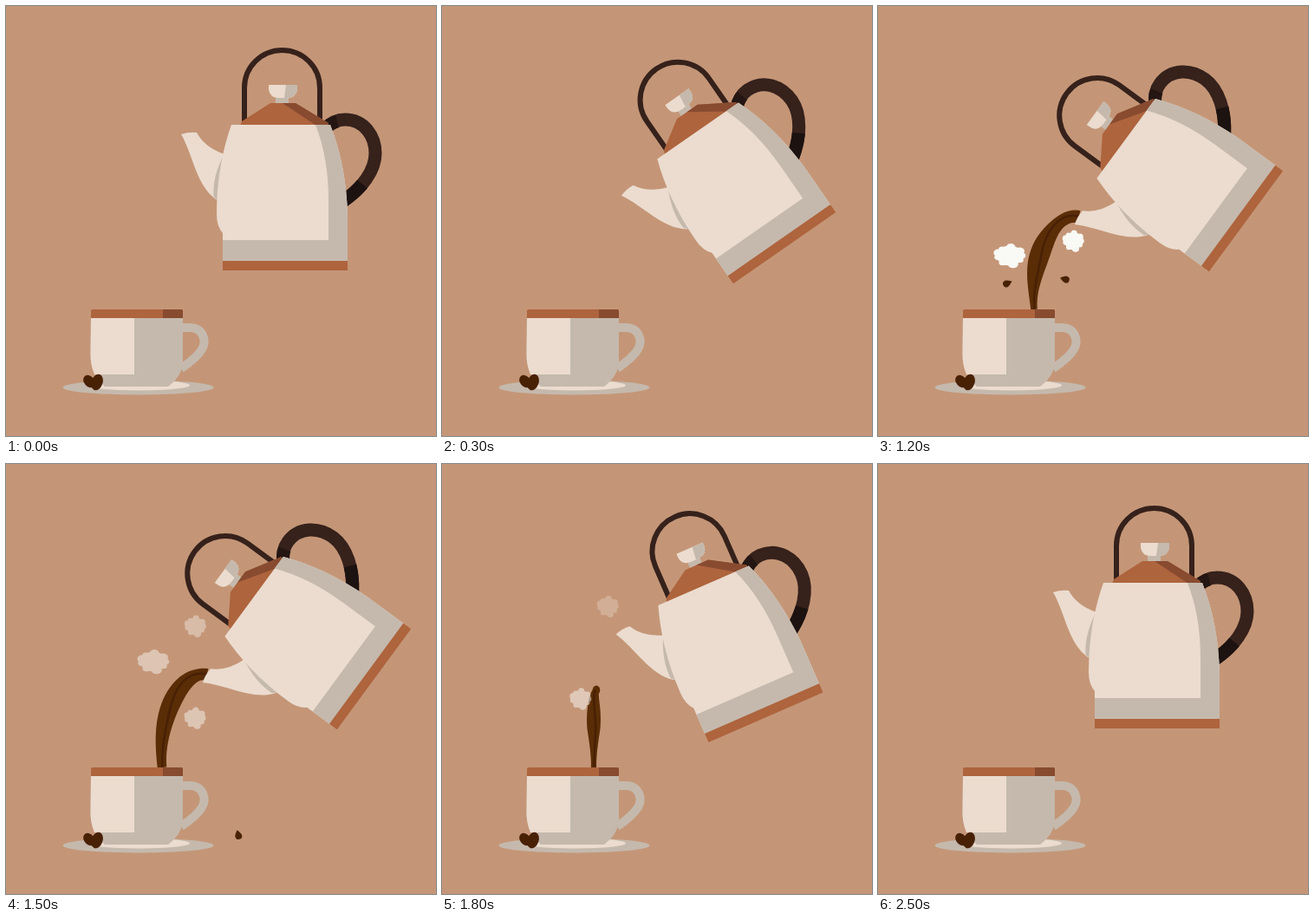
Write an HTML page with a canvas that moves like this. It is 496x496 px and loops after 2.6 s.

```html
<!DOCTYPE html>
<html lang="en">
<head>
<meta charset="utf-8">
<title>Pouring coffee</title>
<style>
  html, body { margin: 0; width: 100%; height: 100%; overflow: hidden; background: #c49677; }
  canvas { display: block; }
</style>
</head>
<body>
<canvas id="stage" width="496" height="496"></canvas>
<script>
const ctx = document.getElementById('stage').getContext('2d');
const LOOP = 2600, STEP = 100;
const CREAM = '#ebdccf', GREY = '#c5b9ad', RUST = '#ae643d', DARK_RUST = '#884b30';
const IRON = '#36211b', BLACK = '#1c1210', COFFEE = '#5a2d07', BEAN = '#482105';
const PIVOT = [317.2, 175.4], TILT = 53.7 * Math.PI / 180;

const clamp = v => Math.max(0, Math.min(1, v));
const mix = (a, b, p) => a + (b - a) * p;
const smooth = v => { v = clamp(v); return v * v * (3 - 2 * v); };

function fill(d, color) {
  ctx.fillStyle = color;
  ctx.fill(new Path2D(d));
}
function stroke(d, color, width) {
  ctx.strokeStyle = color;
  ctx.lineWidth = width;
  ctx.stroke(new Path2D(d));
}
function ellipse(x, y, rx, ry, color, turn = 0) {
  ctx.fillStyle = color;
  ctx.beginPath();
  ctx.ellipse(x, y, rx, ry, turn, 0, 7);
  ctx.fill();
}

function kettle(angle) {
  ctx.save();
  ctx.translate(...PIVOT);
  ctx.rotate(-angle);
  ctx.translate(-PIVOT[0], -PIVOT[1]);
  // handles
  stroke('M275 136V94.5A43.5 43.5 0 0 1 362 94.5V136', IRON, 6);
  stroke('M368 142Q378 131 391 131C413 131 426 150 426 170C426 190 410 211 389 225', IRON, 15);
  stroke('M368 142Q374 135 382 133', '#241612', 15);
  stroke('M411 205.4Q402 216 389 225', BLACK, 15);
  // knob and lid
  fill('M311 104H326V113H311Z', GREY);
  fill('M303 91H336V96Q335 106 324 106H315Q304 106 303 96Z', CREAM);
  fill('M323 91H336V96Q335 106 324 106H321Z', GREY);
  fill('M305 112H334L372 135V138H270L272 133Z', RUST);
  fill('M319 112H334L372 135V138H358Z', DARK_RUST);
  // spout
  fill('M202 148Q211 145 220 146Q229 163 252 171L246 223H242C219 206 216 172 202 148Z', CREAM);
  fill('M252 170Q238 196 239.5 220L246 226Z', GREY);
  // body
  fill('M260 137H374C387 170 393 205 394 240V295H250V262Q243 254 243 240C243 200 250 165 260 137Z', CREAM);
  fill('M357 137H374C387 170 393 205 394 240V295H250V270H372V225C372 190 367 163 357 137Z', GREY);
  fill('M250 294H394V305H250Z', RUST);
  ctx.restore();
}

function cup() {
  ellipse(152.5, 440, 87, 8.5, GREY);
  ellipse(153, 437.5, 59, 6, CREAM);
  stroke('M202 371H212C227 371 232 386 226 396Q220 406 202 418', GREY, 10);
  fill('M98 359H204V413Q202 428 187 439H114Q97 424 97.5 400Z', GREY);
  fill('M98 359H148V425H102Q97 413 97.5 400Z', CREAM);
  fill('M100 350H202Q204 350 204 352V360H98V352Q98 350 100 350Z', RUST);
  fill('M181 350H202Q204 350 204 352V360H181Z', DARK_RUST);
  ellipse(96, 433, 6, 8, BEAN, -0.7);
  ellipse(105, 434, 6.5, 9.5, BEAN, 0.35);
}

// Stream of coffee along a cubic curve, cut to the part between tail and head
function stream(t) {
  const head = clamp((t - 540) / 440);
  const tail = Math.pow(clamp((t - 1600) / 400), 1.32);
  if (head <= 0 || tail >= 1) return;
  const fall = clamp((t - 1600) / 200);
  const bezier = (u, a, b, c, d) => {
    const v = 1 - u;
    return v * v * v * a + 3 * v * v * u * b + 3 * v * u * u * c + u * u * u * d;
  };
  const center = u => [
    mix(bezier(u, 232, 203, 174, 180), 175 + 3 * Math.exp(-20 * (u - tail)), fall),
    bezier(u, 243, 237, 290, 350)
  ];
  const half = u => {
    const swell = 5.5 * Math.sin(Math.PI * u ** 1.3) ** 2 + .8 * Math.sin(9 * u - t / 110) * clamp(5 * u);
    return (7 - 2.5 * u + swell * head * head) * mix(1, Math.min(.8, .4 + 1.2 * (u - tail)), fall);
  };
  const side = (u, k) => {
    const [x, y] = center(u), [x2, y2] = center(u + .01);
    const len = Math.hypot(x2 - x, y2 - y), w = half(u) * k;
    return [x - (y2 - y) / len * w, y + (x2 - x) / len * w];
  };
  const N = 30, edge = [], line = [];
  for (let i = 0; i <= N; i++) {
    const u = mix(tail, head, i / N);
    edge.push(side(u, 1));
    edge.unshift(side(u, -1));
    line.push(side(u, .3 * Math.sin(6 * u)));
  }
  ctx.save();
  ctx.beginPath();
  ctx.rect(0, 0, 496, 352);
  ctx.clip();
  fill('M' + edge.join('L') + 'Z', COFFEE);
  if (head < 1) ellipse(...center(head), half(head), half(head), COFFEE);
  if (tail > 0) ellipse(...center(tail), half(tail) + .5, half(tail) + 1.5, COFFEE);
  stroke('M' + line.join('L'), BEAN, 2.5);
  ctx.restore();
}

function drop(t, x, vx, vy, g) {
  const s = (t - 1000) / 100;
  if (s <= 0) return;
  ctx.save();
  ctx.translate(x + vx * s, 348 + vy * s + g * s * s);
  ctx.rotate(Math.atan2(vy + 2 * g * s, vx));
  fill('M-6 0Q-1 -4 1 -4A4 4 0 0 1 1 4Q-1 4 -6 0Z', BEAN);
  ctx.restore();
}

// start, end, from x y, to x y, half width, half height, opacity from, to
const PUFFS = [
  [600, 1050, 210, 246, 219, 165, 18.5, 14, 1.3, 0],
  [1000, 1750, 140, 328, 185, 178, 18.5, 14, 1.4, 0],
  [1000, 1690, 230, 327, 214, 134, 12.5, 12.5, 1.4, 0],
  [1400, 1950, 227, 336, 178, 100, 12.5, 12.5, .56, .12],
  [1650, 2150, 168, 300, 141, 203, 12.5, 12.5, .72, 0]
];
function puff(t, [start, end, x0, y0, x1, y1, rx, ry, a0, a1]) {
  if (t < start || t >= end) return;
  const p = (t - start) / (end - start);
  ctx.save();
  ctx.globalAlpha = clamp(mix(a0, a1, p));
  ctx.translate(mix(x0, x1, p), mix(y0, y1, p));
  ctx.scale(rx, ry);
  ctx.fillStyle = '#f9f9f6';
  ctx.beginPath();
  ctx.arc(0, 0, .82, 0, 7);
  for (let i = 0; i < 9; i++) {
    const a = i * Math.PI * 2 / 9 + .2 * Math.sin(i * 5), r = .27 + .06 * Math.sin(i * 4);
    const x = .72 * Math.cos(a), y = .72 * Math.sin(a);
    ctx.moveTo(x + r, y);
    ctx.arc(x, y, r, 0, 7);
  }
  ctx.fill();
  ctx.restore();
}

function draw(now) {
  let t = Math.floor(now % LOOP / STEP) * STEP;
  if (t === 1100 || t === 1600) t -= STEP; // two held poses
  ctx.fillStyle = '#c49677';
  ctx.fillRect(0, 0, 496, 496);
  stream(t);
  kettle(TILT * (smooth(t / 500) - smooth((t - 1600) / 370)));
  drop(t, 176, -13.5, -34, 10);
  drop(t, 181, 17.4, -38, 10.8);
  PUFFS.forEach(p => puff(t, p));
  cup();
  requestAnimationFrame(draw);
}
requestAnimationFrame(draw);
</script>
</body>
</html>
```
